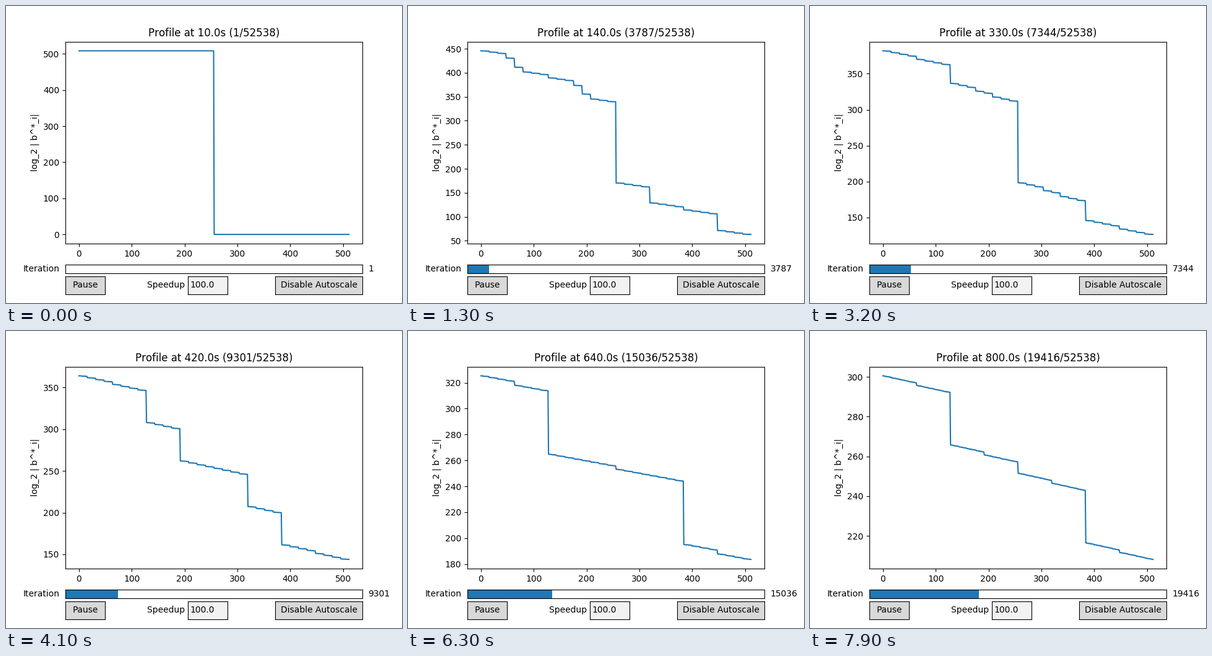
Recreate the animation shown at these times as a matplotlib script. Size 640 px wide and 480 px high, loop 8000 ms.

```python
import matplotlib.pyplot as plt
import numpy as np
from matplotlib.animation import FuncAnimation

plt.rcParams["text.kerning_factor"] = 6

FRAMES, INTERVAL = 80, 100
N, BLOCK = 512, 16
QUARTER = N // 4
TOTAL = 52538
rng = np.random.default_rng(4)
jitter = rng.normal(0, 0.05, N)
jitter[[0, -1]] = 0


def profile(top, slope, cliffs, total=None, fall=0.65):
    """Stairs that drop by slope at each block, plus cliffs {block: extra drop}.

    With a total, the second half is the point reflection of the first.
    """
    drops = np.full(N // BLOCK, float(slope))
    drops[0] = 0
    for block, extra in cliffs.items():
        drops[block] += extra
    y = np.repeat(top - drops.cumsum(), BLOCK)
    y -= np.tile(np.linspace(0, fall, BLOCK), N // BLOCK)
    if total:
        y[N // 2:] = total - y[:N // 2][::-1]
    return y + jitter * (fall > 0)


def handoff(before, after):
    """Outer quarters settled, inner quarters carrying what the outer ones gave up."""
    old, new = before.reshape(4, QUARTER), after.reshape(4, QUARTER).copy()
    for outer, inner in ((0, 1), (3, 2)):
        new[inner] = old[inner] + old[outer].mean() - new[outer].mean()
    return new.ravel()


start = profile(508.5, 0, {16: 508.5}, fall=0)
opened = profile(508.5, 0, {}, 508.5, fall=0)
opened[QUARTER:-QUARTER] = np.linspace(303, 205.5, 2 * QUARTER)
halves = profile(445.8, 2.5, {3: 7.5, 4: 16.5, 5: 7.5, 8: 5, 11: 8, 12: 15.5, 13: 8,
                              16: 167.5, 20: 31.5, 24: 4.5, 28: 33})
quarters = profile(426.4, 2.6, {4: 5, 8: 106.2, 11: 3, 13: 3}, 509.2)
eighths = profile(364.1, 2.2, {4: 1.5, 8: 37, 12: 37.2}, 508)
rejoined = profile(338.9, 1.5, {2: 6.2, 6: 4.8, 8: 12.9, 10: 4, 14: 6, 16: 53,
                                20: 11.4, 24: 12.2, 28: 11.3})
smooth = profile(325.3, 1.2, {4: 2.5, 8: 48.4}, 508.9)
final = profile(300.5, 0.93, {4: 1.1, 8: 26.2, 12: 1.3}, 508.7, fall=0.75)

STAGES = [
    (0, start), (7, opened), (13, halves), (18, handoff(halves, quarters)),
    (24, quarters), (27, quarters), (34, handoff(quarters, eighths)),
    (41, eighths), (50, rejoined), (54, handoff(rejoined, smooth)),
    (63, smooth), (72, handoff(smooth, final)), (79, final)]
COUNTS = [(0, 1), (13, 3787), (24, 5604), (41, 9301),
          (50, 11910), (63, 15036), (79, 19416)]


def curve_at(k):
    for (t0, a), (t1, b) in zip(STAGES, STAGES[1:]):
        if k <= t1:
            return a + (b - a) * (k - t0) / (t1 - t0)


def count_at(k):
    return int(round(np.interp(k, *zip(*COUNTS))))


def panel(left, bottom, width, height, color):
    box = fig.add_axes([left, bottom, width, height], facecolor=color)
    box.set(xticks=[], yticks=[], xlim=(0, 1), ylim=(0, 1))
    return box


fig = plt.figure(figsize=(6.4, 4.8), dpi=100)
ax = fig.add_axes([0.15, 0.2, 0.75, 0.68])
line, = ax.plot(np.arange(N), start)
ax.set_ylabel("log_2 | b^*_i|")
title = ax.set_title("")

slider = panel(0.15, 0.1, 0.75, 0.03, "white")
bar = plt.Rectangle((0, 0), 0, 1, facecolor="C0", linewidth=0)
slider.add_patch(bar)
slider.text(-0.02, 0.5, "Iteration", ha="right", va="center")
counter = slider.text(1.02, 0.5, "", ha="left", va="center")

for left, width, label in ((0.15, 0.1, "Pause"), (0.68, 0.22, "Disable Autoscale")):
    panel(left, 0.03, width, 0.06, "0.85").text(0.5, 0.5, label, ha="center", va="center")
entry = panel(0.46, 0.03, 0.1, 0.06, "0.95")
entry.text(-0.01, 0.5, "Speedup ", ha="right", va="center")
entry.text(0.05, 0.5, "100.0", ha="left", va="center")


def update(k):
    y, count = curve_at(k), count_at(k)
    line.set_ydata(y)
    pad = 0.05 * np.ptp(y)
    ax.set_ylim(y.min() - pad, y.max() + pad)
    title.set_text(f"Profile at {10.0 * (k + 1):.1f}s ({count}/{TOTAL})")
    bar.set_width(count / TOTAL)
    counter.set_text(str(count))
    return line, title, bar, counter


anim = FuncAnimation(fig, update, frames=FRAMES, interval=INTERVAL,
                     repeat=True, repeat_delay=0, blit=False)
plt.show()
```
